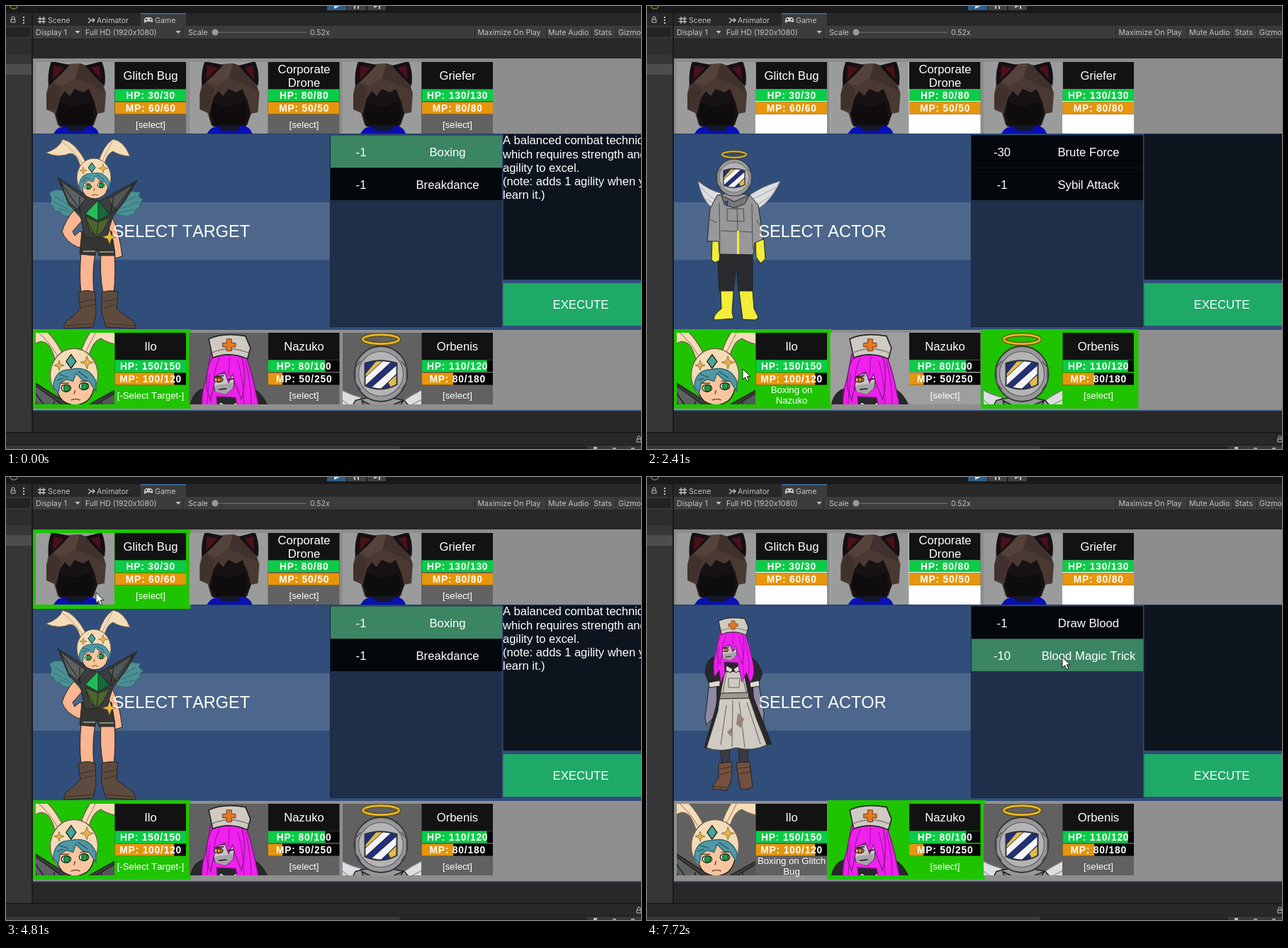
An HTML page with a canvas that plays this animation: 896x625 px, repeating every 8 s.

```html
<!DOCTYPE html>
<html lang="en">
<head>
<meta charset="utf-8">
<title>Battle menu</title>
<style>
html, body { margin: 0; width: 100%; height: 100%; overflow: hidden; background: #282828; }
canvas { display: block; }
</style>
</head>
<body>
<canvas id="stage" width="896" height="625"></canvas>
<script>
const ctx = document.getElementById('stage').getContext('2d');
const LOOP = 8000;
const GAME = '"Liberation Sans", Arial, sans-serif';
const UI = 'Inter, sans-serif';
const GREEN = '#1fc400';
const INK = '#25231f';

// ---- drawing helpers ----
function rect(color, x, y, w, h) {
  ctx.fillStyle = color;
  ctx.fillRect(x, y, w, h);
}
function shape(fill, d, line = INK, width = 1) {
  const p = new Path2D(d);
  if (fill) { ctx.fillStyle = fill; ctx.fill(p); }
  if (line) { ctx.strokeStyle = line; ctx.lineWidth = width; ctx.stroke(p); }
}
function oval(fill, x, y, rx, ry, line = INK, width = 1) {
  ctx.beginPath();
  ctx.ellipse(x, y, rx, ry, 0, 0, Math.PI * 2);
  if (fill) { ctx.fillStyle = fill; ctx.fill(); }
  if (line) { ctx.strokeStyle = line; ctx.lineWidth = width; ctx.stroke(); }
}
function spark(x, y, r, color) {
  const k = r * 0.25;
  shape(color, `M${x} ${y - r}L${x + k} ${y - k}L${x + r} ${y}L${x + k} ${y + k}L${x} ${y + r}L${x - k} ${y + k}L${x - r} ${y}L${x - k} ${y - k}Z`, '#6b5a22', 0.5);
}
function text(str, x, y, size, { align = 'center', color = '#fff', font = GAME, bold = false, gap = 0 } = {}) {
  ctx.font = `${bold ? 'bold ' : ''}${size}px ${font}`;
  ctx.letterSpacing = gap + 'px';
  ctx.fontKerning = font === UI ? 'normal' : 'none';
  ctx.textAlign = align;
  ctx.textBaseline = 'alphabetic';
  ctx.fillStyle = color;
  ctx.fillText(str, x, y + size * 0.36);
}

// ---- characters ----
function bunny() {
  const skin = '#fbb591', fur = '#f5dcb8', dark = '#3b3d3e', teal = '#4c9095';
  shape(teal, 'M98 270Q74 252 61 264Q65 270 64 275Q60 280 67 283Q67 290 76 290Q82 300 94 295L108 288Z', '#2d6469');
  shape(teal, 'M150 272Q166 258 190 263Q184 270 194 273Q186 279 190 284Q182 285 182 292Q170 301 152 292Z', '#2d6469');
  shape(null, 'M68 268L90 282M67 276L88 287M74 286L92 291M184 268L160 281M187 276L162 286M181 287L160 291', '#326f74');
  shape(skin, 'M96 288Q84 302 79 318Q84 333 103 341L116 334L118 322L104 318L97 324L94 318L108 302Z');
  shape(skin, 'M149 296Q160 318 164 353L154 356Q153 330 143 308Z');
  shape(skin, 'M106 348L126 348Q121 376 124 405L106 405Q103 380 106 348Z');
  shape(skin, 'M134 348L153 348Q155 380 152 405L137 405Q132 380 134 348Z');
  shape('#5f4b3e', 'M102 404Q115 399 126 404L127 434L123 453L82 455Q80 446 94 438L105 427Z');
  shape('#5f4b3e', 'M135 404Q147 400 158 403L156 427L170 438Q184 445 183 455L141 453L135 432Z');
  shape(null, 'M104 418L126 414M104 426L126 421M137 417L157 413M138 426L157 421M84 451L123 448M141 448L182 451', '#3a2e27');
  shape('#353631', 'M107 318L149 318L154 352L131 352L129 342L125 352L104 350Z');
  shape(null, 'M109 346L126 346M132 347L152 347', '#8b8a7d', 2);
  shape(dark, 'M73 242L120 272L131 276L185 246L169 273L151 297L141 327L111 327L105 295L89 281Z');
  shape('#5c6161', 'M76 246L112 272L101 287L88 276Z');
  shape('#525858', 'M181 250L144 273L156 288L167 272Z');
  shape(null, 'M76 247L107 291M104 268L104 292M180 250L148 295M152 269L147 293', '#191b1b');
  shape('#22bd58', 'M130 274L112 293L130 303L146 294Z');
  shape('#146b3c', 'M130 274L130 303L146 294Z');
  shape('#4d642f', 'M112 297L130 305L147 298L137 317L128 326L118 317Z');
  shape(null, 'M130 305L128 326M113 301L126 324', '#202820');
  spark(146, 326, 10, '#efb53c');
  shape(fur, 'M113 221Q98 192 80 188Q75 201 56 207Q75 215 90 208Q100 207 105 227Z', '#71604e');
  shape(fur, 'M130 221Q138 196 151 188Q166 190 175 212Q160 211 151 205Q142 208 138 226Z', '#71604e');
  shape(null, 'M78 191Q96 203 107 222M150 191Q143 204 134 222', '#a78d70', 0.8);
  oval(fur, 124, 242, 24, 27, '#71604e');
  shape('#f7c69f', 'M106 247Q125 229 144 245Q146 260 137 268Q125 276 113 268Q105 260 106 247Z');
  shape('#5197a4', 'M103 254Q104 236 121 236Q139 232 146 248L146 258L139 248L133 247L126 240L123 248L116 246L110 250L108 260Z', '#2c6671');
  shape(null, 'M109 241L118 244M128 238L138 245M107 247L113 245', '#235c68');
  for (const [x, y] of [[116, 255], [134, 253]]) {
    oval('#f4f4ec', x, y, 4.8, 3.6);
    oval('#1c9c43', x + 0.5, y, 2.9, 3.3, '#0c4d23');
  }
  shape(null, 'M125 257L124 261M121 267Q126 265 130 267M110 250L119 250M130 248L139 248', '#6d4430');
  shape('#45a69b', 'M121 221L126 228L121 235L116 228Z');
  spark(137, 229, 6.5, '#e9b24b');
  spark(109, 232, 5, '#e9b24b');
}

function nurse() {
  const cloth = '#cfcac2', black = '#28272b', pink = '#f020ee';
  shape('#3c3a42', 'M103 380L116 380L117 407L106 407ZM130 380L142 380L142 407L130 407Z');
  shape('#74503f', 'M101 404L120 402L119 427L113 442Q101 440 93 441Q92 434 101 425Z');
  shape('#74503f', 'M126 403L145 402L147 422L149 437Q141 442 132 440L129 425Z');
  shape(null, 'M103 412L119 409M103 420L119 416M128 411L145 409M130 419L146 416M94 437L113 438', '#442c25');
  shape('#8f8aa3', 'M88 290L101 292L96 337L84 350L82 340Z');
  shape('#8f8aa3', 'M147 291L157 289L165 332L164 350L156 344Z');
  shape(black, 'M98 252L141 250L149 279L150 310L176 377L81 382L99 318L98 282Z');
  shape(black, 'M96 253Q82 257 82 278L88 292L105 288L106 263Z');
  shape(black, 'M140 251Q155 254 163 277L158 290L144 291L138 265Z');
  shape('#dedbd2', 'M87 290L103 287L103 295L88 297ZM145 290L158 287L159 295L146 297Z');
  shape(cloth, 'M110 275L136 274L143 308L154 340L169 378Q149 388 126 382Q102 389 84 382L100 330L103 308Z', '#3a3733');
  shape('#9d9992', 'M104 305L143 304L144 312L102 313Z');
  shape(null, 'M112 276L107 305M133 275L140 304M112 322L104 378M121 315L120 381M130 317L138 382M141 318L160 377M115 284L131 284L130 297L115 297Z', '#655f58');
  shape('#9b8375', 'M128 333L137 341L132 354L126 349ZM113 360L121 352L119 367Z', null);
  shape('#dedbd2', 'M112 266L121 271L118 276L111 273ZM122 271L131 265L131 273L125 276Z');
  // hair behind, face, then fringe
  shape(pink, 'M103 218Q120 211 138 219Q145 238 149 260Q154 277 146 290L140 276L134 289L128 262L109 261L110 276L104 290L102 272L95 282Q92 262 98 244Z', '#761b76');
  shape('#c9c6c7', 'M104 239L127 237L126 252L118 259L107 255Z', '#543047');
  shape('#a7a4a8', 'M107 250L126 247L125 253L118 259L108 256Z', null);
  shape(pink, 'M99 254Q98 228 107 219L134 219Q140 242 134 264L127 246L125 238L121 247L117 236L109 240L106 250L103 265Z', '#84208a');
  oval('#fff4db', 111, 244, 4.2, 2.5);
  oval('#df8726', 111.4, 244, 2.2, 2.3, '#5c2a11');
  shape(null, 'M106 241L116 240M120 244L126 243M111 254L119 253', '#34202c', 1.2);
  shape(null, 'M130 225Q138 249 136 280M138 225Q146 257 143 283M102 238L99 272M112 222Q106 234 106 246M122 221L121 240', '#99159d', 0.8);
  shape(cloth, 'M101 203Q115 196 138 200L143 212L140 223Q122 215 105 222Z', '#292725', 1.2);
  shape(null, 'M104 217Q122 209 141 217', '#807a74');
  shape('#e37b22', 'M119 203L124 203L124 207L128 207L128 211L124 211L124 215L119 215L119 211L115 211L115 207L119 207Z', '#713817', 0.7);
}

function angel() {
  const steel = '#98989a', yellow = '#f3ed38';
  shape('#dcdee1', 'M104 292Q79 282 72 247Q87 260 104 264Z', '#77787d');
  shape('#dcdee1', 'M146 290Q171 284 188 247Q163 254 143 268Z', '#77787d');
  shape(null, 'M77 256Q88 270 101 276M83 272L103 284M182 256L148 273M173 269L151 283', '#8d8f94', 0.8);
  shape('#292a2d', 'M99 347L149 347L149 403L129 403L126 365L122 403L102 403Z');
  shape(yellow, 'M104 402L122 402L120 432L122 441L95 443Q92 437 105 427Z');
  shape(yellow, 'M130 402L149 402L151 427L157 439L153 443L135 442Z');
  shape(yellow, 'M92 329L104 331L102 359L96 362L91 358Z');
  shape(yellow, 'M153 331L165 329L167 357L160 363L154 354Z');
  shape(steel, 'M99 267Q120 261 145 267L157 281L164 329L152 334L150 351L102 350L101 332L85 332L89 286Z');
  shape('#77787a', 'M105 267L123 276L144 267L138 279L123 285L109 280Z');
  shape(null, 'M102 278L103 348M148 279L149 343M127 284L129 350M113 286L136 286L137 304L113 303ZM104 317L149 319M89 301L98 306M155 302L161 312', '#4a4b4d');
  shape('#f3eb40', 'M127 317L130 317L130 350L127 350Z', null);
  shape('#263a94', 'M109 275L115 275L113 284Z', null);
  oval(steel, 123, 242, 25, 26, '#353638', 1.2);
  oval('#b4b4b6', 123, 242, 21, 21, '#606163', 0.8);
  const visor = 'M108 232Q122 227 138 232L138 252Q124 260 108 253Z';
  ctx.save();
  ctx.clip(new Path2D(visor));
  rect('#232f78', 105, 226, 36, 36);
  shape('#e1bd48', 'M122 226L133 226L113 244L107 244ZM130 250L141 240L141 250L134 258Z', null);
  shape('#f4f4f6', 'M104 249L129 226L138 226L104 257ZM108 260L141 231L141 239L119 260Z', '#1b1d2b', 0.6);
  ctx.restore();
  shape(null, visor, '#2e3035', 1.3);
  shape(null, 'M104 230L99 236L99 250L104 257M142 230L147 236L147 250L142 257', '#515255');
  oval(null, 123, 209.5, 17, 4.3, '#54430a', 3.4);
  oval(null, 123, 209.5, 17, 4.3, '#e4b526', 2);
}

function drone() {
  shape('#4a3933', 'M57 124L61 106L75 90L89 82L104 81L119 86L134 101L141 123L139 150L129 152L124 168L73 168L68 151L57 146Z', null);
  shape('#55433b', 'M75 90L89 82L104 81L98 102L80 112L66 108Z', null);
  shape('#40312d', 'M104 81L119 86L134 101L138 120L118 110L98 102ZM57 124L66 108L78 118L70 146L57 146Z', null);
  shape('#171213', 'M70 153L76 130L83 120L90 127L97 117L109 122L117 117L125 136L129 153L122 170L75 170Z', null);
  shape('#0e0c0d', 'M76 136L96 143L121 135L124 156L117 170L82 170L73 155Z', null);
  shape('#150f13', 'M64 78L90 83L78 96L60 113Q58 94 64 78ZM135 78L112 84L121 95L139 113Q142 94 135 78Z', null);
  shape('#4a1118', 'M67 84L82 87L66 104ZM132 84L120 87L134 104Z', null);
  shape('#0810b4', 'M67 180Q73 169 86 169L119 169Q128 171 131 180Z', null);
  shape('#15172a', 'M82 168L116 168L110 176L89 176Z', null);
}

// ---- cards ----
const CARD_X = [42, 258.5, 475];
const foes = [['Glitch Bug'], ['Corporate', 'Drone'], ['Griefer']];
const foeStats = [[30, 60], [80, 50], [130, 80]];
// from: centre in the figure, to: centre in the portrait
const party = [
  { name: 'Ilo', hp: [150, 150], mp: [100, 120], draw: bunny, from: [124, 242], to: [54, 60], zoom: 1.4,
    moves: [['-1', 'Boxing'], ['-1', 'Breakdance']] },
  { name: 'Nazuko', hp: [80, 100], mp: [50, 250], draw: nurse, from: [122, 211], to: [57, 20], zoom: 1.4,
    moves: [['-1', 'Draw Blood'], ['-10', 'Blood Magic Trick']] },
  { name: 'Orbenis', hp: [110, 120], mp: [80, 180], draw: angel, from: [123, 242], to: [54, 58], zoom: 1.5,
    moves: [['-30', 'Brute Force'], ['-1', 'Sybil Attack']] }
];

function bar(label, value, max, color, x, y, h) {
  rect('#050505', x, y, 100.5, h);
  rect(color, x, y, 100.5 * value / max, h);
  text(`${label}: ${value}/${max}`, x + 50.7, y + h / 2, 13.8, { bold: true, gap: 0.8 });
}
function card(x, y, title, hp, mp, base, lit, status) {
  if (lit) rect(GREEN, x - 4, y - 5, 222.5, 112);
  else rect(base, x, y, 212, 101);
  rect('#121212', x + 111.5, y, 100.5, 38);
  title.forEach((s, i) => text(s, x + 162, y + 19 + (i - (title.length - 1) / 2) * 19, 16.7));
  bar('HP', ...hp, '#0bcc47', x + 111.5, y + 38.5, 16.5);
  bar('MP', ...mp, '#e6960c', x + 111.5, y + 56.5, 17);
  status.forEach((s, i) => text(s, x + 162, y + 88 + (i - (status.length - 1) / 2) * 15, 13.2));
}
function foeCard(i, aiming, lit) {
  const x = CARD_X[i], [hp, mp] = foeStats[i];
  card(x, 79, foes[i], [hp, hp], [mp, mp], aiming ? '#626262' : '#fff', lit, aiming ? ['[select]'] : []);
  rect('#9a9c9b', x, 79, 111, 101);
  ctx.save();
  ctx.beginPath();
  ctx.rect(x, 79, 111, 101);
  ctx.clip();
  ctx.translate(x - 42, 0);
  drone();
  ctx.restore();
}
function allyCard(i, lit, glow, status) {
  const x = CARD_X[i], p = party[i], g = Math.round(97 + 152 * glow);
  card(x, 461, [p.name], p.hp, p.mp, `rgb(${g},${g},${g})`, lit, status);
  ctx.save();
  ctx.beginPath();
  ctx.rect(x, 461, 111, 101);
  ctx.clip();
  ctx.translate(x + p.to[0], 461 + p.to[1]);
  ctx.scale(p.zoom, p.zoom);
  ctx.translate(-p.from[0], -p.from[1]);
  p.draw();
  ctx.restore();
}

// ---- editor window ----
const ui = (s, x, y) => text(s, x, y, 10.6, { align: 'left', color: '#c4c4c4', font: UI });
const arrow = x => shape('#c4c4c4', `M${x - 3.5} 35L${x + 3.5} 35L${x} 39Z`, null);
function lock(x, y) {
  shape(null, `M${x - 2} ${y}L${x - 2} ${y - 3}Q${x} ${y - 6} ${x + 2} ${y - 3}L${x + 2} ${y}M${x - 3} ${y}h6v4h-6Z`, '#bcbcbc');
}
function editor() {
  rect('#282828', 0, 0, 896, 625);
  rect('#191919', 0, 0, 896, 10);
  rect('#363636', 0, 28, 36, 573);
  rect('#232323', 0, 30, 34, 14);
  rect('#2d2d2d', 0, 46, 36, 22);
  rect('#4d4d4d', 0, 82, 36, 15);
  rect('#191919', 36, 10, 2, 591);
  oval(null, 11, 0, 5, 4, '#8f7530', 1.5);
  lock(10, 19);
  for (const y of [15, 19, 23]) rect('#c4c4c4', 24, y, 2, 2);
  rect('#2c5d87', 453, 0, 27, 6);
  rect('#414141', 481, 0, 27, 6);
  rect('#414141', 510, 0, 26, 6);
  shape('#d8e4ef', 'M463 0L471 0L463 4Z', null);
  rect('#c4c4c4', 491, 0, 2, 4);
  rect('#c4c4c4', 496, 0, 2, 4);
  shape('#c4c4c4', 'M519 0L525 0L519 3ZM526 0h2v4h-2Z', null);
  rect('#3c3c3c', 190, 11, 64, 18);
  rect('#3a72b0', 190, 10, 64, 1.5);
  rect('#3c3c3c', 38, 28, 858, 18);
  rect('#202020', 38, 46, 858, 1);
  shape(null, 'M48 15v10M53 15v10M45 18h11M45 22h11', '#c4c4c4', 1.3);
  shape(null, 'M116 17L120 20L116 24M120 20h5M122 17L125 20L122 23', '#c4c4c4', 1.3);
  shape('#c4c4c4', 'M198 16L204 16Q208 17 207 23L203 22L199 22L195 24Q194 17 198 16Z', null);
  rect('#3c3c3c', 197, 18, 2, 2);
  rect('#3c3c3c', 203, 18, 2, 2);
  ui('Scene', 59, 20); ui('Animator', 128, 20); ui('Game', 210, 20);
  ui('Display 1', 42, 37); ui('Full HD (1920x1080)', 112, 37);
  ui('Scale', 257, 37); ui('0.52x', 429, 37);
  ui('Maximize On Play', 665.5, 37); ui('Mute Audio', 765, 37);
  ui('Stats', 829.5, 37); ui('Gizmos', 864, 37);
  arrow(101); arrow(243);
  for (const x of [108, 249, 661, 762, 826, 860]) rect('#2a2a2a', x, 29, 1, 17);
  rect('#626262', 291, 36.5, 133, 1.5);
  oval('#999', 295, 37, 4.5, 4.5, null);
  rect('#151515', 0, 601, 896, 1.5);
  rect('#191919', 0, 619, 896, 1);
  rect('#383838', 0, 620, 896, 5);
  rect('#222', 555, 621, 265, 4);
  rect('#bcbcbc', 829, 622, 5, 3);
  rect('#999', 856, 623, 5, 2);
  rect('#999', 882, 623, 5, 2);
  lock(893, 611);
}

// ---- timeline ----
const PENDING = ['[-Select Target-]'], ON_NURSE = ['Boxing on', 'Nazuko'], ON_BUG = ['Boxing on Glitch', 'Bug'];
// [start, choosing a target, active ally, first ally's status]
const scenes = [
  [0, true, 0, PENDING],
  [1560, false, -1, ON_NURSE],
  [1870, false, 2, ON_NURSE],
  [2550, false, 0, ON_NURSE],
  [3920, true, 0, PENDING],
  [5290, false, -1, ON_BUG],
  [6570, false, 1, ON_BUG]
];
// [from, to, card], foes 0-2, allies 3-5
const hovers = [[1280, 1560, 4], [1830, 2270, 5], [2410, 2550, 3], [4740, 5290, 0], [6300, 6570, 4]];
// [from, to, row]
const rowLit = [[0, 1560, 0], [3450, 5290, 0], [7650, 8000, 1]];
const bursts = [0, 460, 1000, 1280, 2270, 3100, 3920, 4530, 5290, 6020, 6570, 7230];
const track = [
  [460, 641, 591], [800, 187, 515], [1000, 187, 515], [1140, 378, 514], [1280, 378, 514],
  [1560, 427, 513], [1690, 427, 513], [1840, 560, 516], [2270, 560, 516], [2410, 135, 512],
  [2830, 135, 512], [2970, 164, 478], [3100, 164, 478], [3450, 594, 204], [3590, 594, 204],
  [3730, 601, 211], [4530, 601, 211], [4670, 253, 205], [4810, 127, 163], [5020, 144, 113],
  [6020, 144, 113], [6370, 340, 487], [6570, 340, 487], [6780, 352, 486], [7230, 352, 486], [7720, 586, 254]
];
const lastFrom = (list, t) => list.filter(e => e[0] <= t).pop();
const during = (list, t) => (list.find(([a, b]) => t >= a && t < b) || [])[2];
const clamp = v => Math.min(1, Math.max(0, v));

function pointer(t) {
  if (t < 460) return;
  const start = bursts.filter(b => b <= t).pop();
  const q = start + Math.floor((t - start) / 70) * 70;
  const a = lastFrom(track, q), b = track[track.indexOf(a) + 1] || a;
  const k = b === a ? 0 : (q - a[0]) / (b[0] - a[0]);
  const e = k * k * (3 - 2 * k);
  ctx.save();
  ctx.translate(a[1] + (b[1] - a[1]) * e, a[2] + (b[2] - a[2]) * e);
  shape('#fff', 'M0 0L0 15L3.6 11.8L6.2 17.5L8.8 16.3L6.2 10.8L11 10.8Z', '#1a1a1a');
  ctx.restore();
}
function nurseGlow(t) {
  if (t >= 1560 && t < 2270) return clamp((1850 - t) / 160);
  if (t >= 2340) return 0.4 * clamp((2580 - t) / 110);
  return 0;
}

function centre(aiming, active, hero, t) {
  rect('#314d79', 38, 180, 858, 277);
  rect('#223b63', 38, 180, 858, 1);
  rect('#4c678b', 38, 277, 419, 81);
  party[hero].draw();
  text(aiming ? 'SELECT TARGET' : 'SELECT ACTOR', 247.5, 318, 23.5);
  rect('#19263b', 457, 182, 243, 271);
  rect('#1f2f49', 458, 183, 242, 269);
  if (active >= 0) {
    const lit = during(rowLit, t);
    party[active].moves.forEach(([cost, name], i) => {
      const y = 182.5 + i * 46;
      rect(i === lit ? '#3b8563' : '#04070b', 458, y, 242, 45.5);
      text(cost, 501, y + 23, 16.7);
      text(name, 623, y + 23, 16.7);
    });
  }
  rect('#0d141e', 701.5, 181, 195, 205);
  rect('#1fa967', 701.5, 391, 195, 60);
  text('EXECUTE', 811, 421, 16.7);
  if (aiming) {
    ['A balanced combat technique', 'which requires strength and', 'agility to excel.',
      '(note: adds 1 agility when you', 'learn it.)'].forEach((s, i) =>
      text(s, 701, 189.5 + i * 19.1, 16.5, { align: 'left' }));
  }
}

function draw(t) {
  const [, aiming, active, note] = lastFrom(scenes, t);
  const hover = during(hovers, t);
  editor();
  rect('#8d8d8d', 38, 74, 858, 106);
  centre(aiming, active, active < 0 ? 0 : active, t);
  rect('#8f8f8f', 38, 457, 858, 113);
  rect('#395780', 38, 570, 858, 1.5);
  for (let i = 0; i < 3; i++) {
    foeCard(i, aiming, hover === i);
    allyCard(i, active === i || hover === i + 3, i === 1 ? nurseGlow(t) : 0, i ? ['[select]'] : note);
  }
  pointer(t);
}

const begin = performance.now();
function tick() {
  draw((performance.now() - begin) % LOOP);
  requestAnimationFrame(tick);
}
tick();
</script>
</body>
</html>
```
